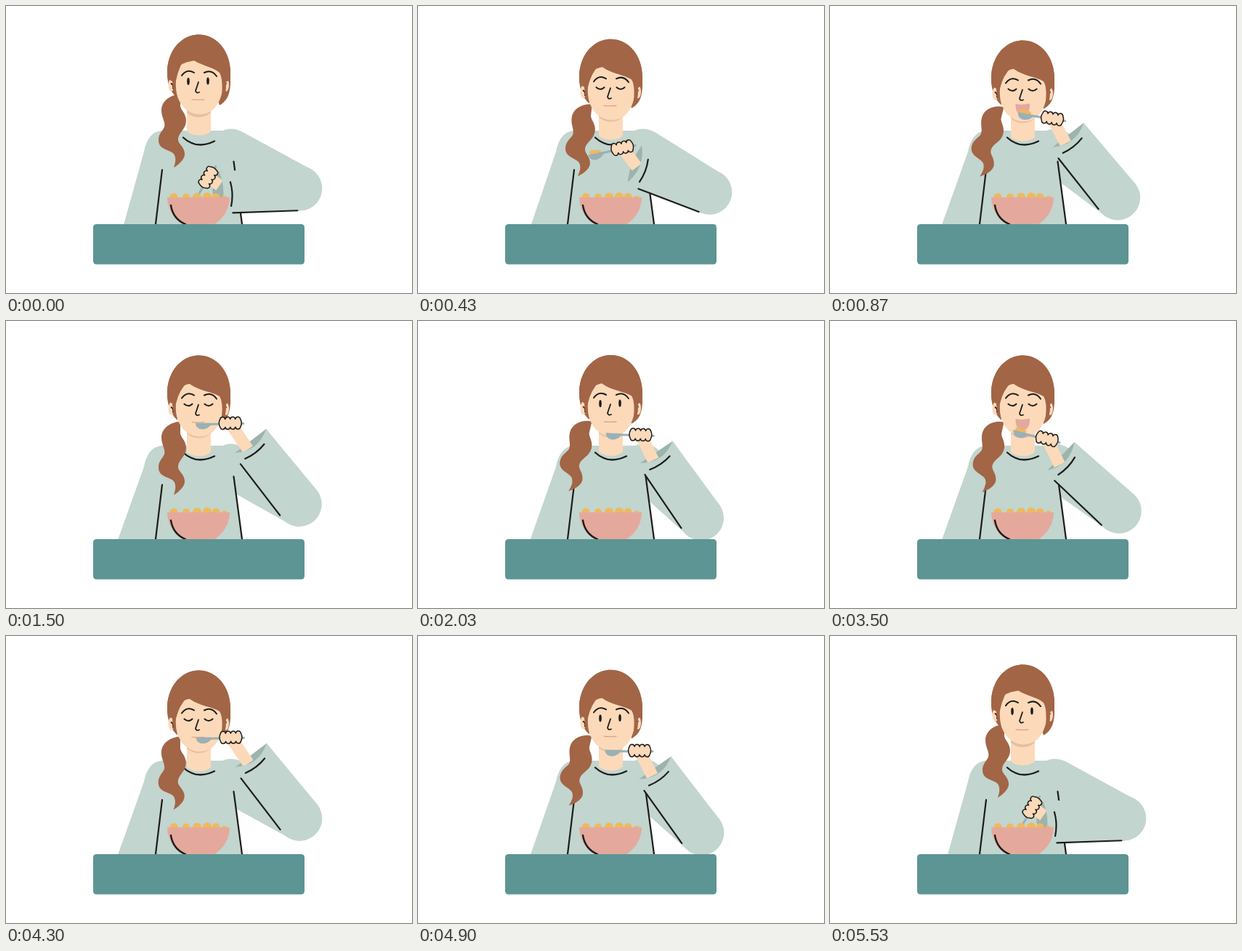
An HTML page that plays this animation: 559x396 px, repeating every 5610 ms.

```html
<!DOCTYPE html>
<html lang="en">
<head>
<meta charset="utf-8">
<title>Eating from a bowl</title>
<style>
  html, body { margin: 0; width: 100%; height: 100%; overflow: hidden; background: #fff; }
  svg { display: block; width: 100vw; height: 100vh; }
</style>
</head>
<body>
<svg id="stage" viewBox="0 0 559 396"></svg>
<script>
const LOOP = 5610, MEAL = LOOP / 2, FIRST_HOLD = 100, STEP = 69.6, STEP_LEAD = 20;
const INK = '#1d1d1b', SKIN = '#fcd9b9', SHADE = '#e6bfa0', HAIR = '#a26546',
  SHIRT = '#c2d5ce', CUFF = '#9db3ad', METAL = '#9ab1b5', FOOD = '#f0b95a',
  PINK = '#e4a99c', TABLE = '#5c9593';
const SHOULDER = { x: 310, y: 200 }, UPPER = 107.5, FORE = 110;

// Each row: time, upper arm angle, forearm angle, spoon angle, hand offset x, y, reach
const rest = [28.7, 178, 121.5, -16, -19, 0];
const armKeys = [
  [0, ...rest], [100, ...rest],
  [695, 35.2, 222.8, 194, -19, -24, 1],
  [870, 36.8, 231.8, 189, -22, -23, 1],
  [1320, 25, 234, 178, -28, -25, 1],
  [1495, 29.4, 232.5, 179, -28, -24.5, 1],
  [2030, 42, 236, 182, -22, -24, 1],
  [2725, ...rest], [MEAL, ...rest]
];
const nodKeys = [[0, 0], [100, 0], [225, .22], [600, 1], [1930, 1], [2400, .5], [2750, 0], [MEAL, 0]];
const tailKeys = [[0, 0], [100, 0], [695, 12], [870, 14], [1200, 13.5], [1495, 0],
  [1830, 10], [2030, 13.5], [2725, 0], [MEAL, 0]];
const browKeys = [[0, 0], [1265, 0], [1345, 6], [1425, 0], [MEAL, 0]];

// Monotone cubic interpolation of one column
function sample(keys, time, col = 1) {
  let i = 0;
  while (i < keys.length - 2 && time >= keys[i + 1][0]) i++;
  const slope = k => k < 0 || k > keys.length - 2 ? 0
    : (keys[k + 1][col] - keys[k][col]) / (keys[k + 1][0] - keys[k][0]);
  const tangent = k => {
    const a = slope(k - 1), b = slope(k);
    return a * b <= 0 ? 0 : 2 * a * b / (a + b);
  };
  const span = keys[i + 1][0] - keys[i][0], u = (time - keys[i][0]) / span;
  const p = keys[i][col], q = keys[i + 1][col], s = u * u * (3 - 2 * u);
  return p + (q - p) * s + span * u * (1 - u) * ((1 - u) * tangent(i) - u * tangent(i + 1));
}

const polar = (origin, length, deg) => ({
  x: origin.x + length * Math.cos(deg * Math.PI / 180),
  y: origin.y + length * Math.sin(deg * Math.PI / 180)
});
const fill = (d, color) => `<path d="${d}" fill="${color}"/>`;
const line = (d, width = 2, color = INK, cap = 'round') =>
  `<path d="${d}" fill="none" stroke="${color}" stroke-width="${width}" stroke-linecap="${cap}"/>`;
const oval = (x, y, rx, ry, color) => `<ellipse cx="${x}" cy="${y}" rx="${rx}" ry="${ry}" fill="${color}"/>`;
const group = (transform, content) => `<g transform="${transform}">${content}</g>`;

function body(nod, elbow) {
  return line(`M${SHOULDER.x} ${SHOULDER.y}L${elbow.x} ${elbow.y}`, 61, SHIRT)
    + fill(`M${162 - 8 * nod} 302L190 201Q195 174 214 172H308Q313 180 313 214L325 302Z`, SHIRT)
    + line('M215 226L206 301M313.5 214.5L325 301', 2.2)
    + line('M244 181.5Q262 198.5 287 186.5', 2.3);
}

function ponytail(nod, angle) {
  return group(`translate(0 ${17 * nod}) rotate(${angle} 238 120)`, fill(
    'M240 122C228 122 214 130 214 144C214 154 220 160 218 167C216 172 210 176 210 185' +
    'C210 199 226 198 231 204C235 210 233 217 231 223C241 217 247 209 246 203' +
    'C245 193 236 190 237 183C238 174 248 170 248 158C248 147 239 143 240 136Z', HAIR));
}

function features(time, nod) {
  const closed = time > 430 && time < 1650, open = time > 480 && time < 1250;
  const lift = sample(browKeys, time);
  const eyes = closed
    ? line('M245.5 104Q251 109 256.5 104M273.5 104Q279 109 284.5 104')
    : oval(251, 104, 1.8, 5, INK) + oval(278, 103.5, 1.8, 5, INK);
  const gape = open ? Math.min(1, (time - 480) / 130, (1250 - time) / 100) : 0;
  const corner = 124 + 10 * gape, chin = 124 + 16.5 * gape;
  const mouth = gape > 0
    ? fill(`M255.5 124.5Q265 126.5 275 124C276 ${corner} 271 ${chin} 265 ${chin}` +
      `C259 ${chin} 255 ${corner} 255.5 124.5Z`, PINK)
    : line('M256 129Q265 130 273 129', 1.2, '#dca287');
  return group(`translate(0 ${10.5 * nod})`,
    group(`translate(0 ${-lift})`, line('M242 96Q249 86 259 92M273 92Q283 87 290 97'))
    + eyes + line('M265 105L261 117Q262 121 266 119', 1.8) + mouth);
}

function head(time, nod, tail) {
  const y = (base, travel) => base + travel * nod;
  const crown = `M222 ${y(92, 8)}C222 ${y(62, 8)} 241 ${y(39.5, 8)} 265.5 ${y(39.5, 8)}` +
    `C290 ${y(39.5, 8)} 309 ${y(62, 8)} 309 ${y(92, 8)}`;
  const back = crown + `V${y(108, 6)}C308 ${y(124, 6)} 303 ${y(132, 5)} 294 ${y(137, 5)}` +
    `L288 120H242L235 ${y(126, 10)}C226 ${y(118, 9)} 222 ${y(108, 8)} 222 ${y(92, 8)}Z`;
  // Fringe with a pointed parting and a lock of hair in front of each ear
  const fringe = crown + `V${y(101, 9)}L303 ${y(105, 10)}Q304 ${y(124, 8)} 296 ${y(134, 6)}` +
    `Q300 ${y(102, 11)} 294 ${y(92, 12)}C283 ${y(82, 15)} 261 ${y(82, 14)} 250 ${y(67, 17)}` +
    `Q238 ${y(82, 14)} 234 ${y(103, 11)}Q233 ${y(114, 11)} 236 ${y(126, 11)}` +
    `Q229 ${y(118, 11)} 229 ${y(104, 10)}L223 ${y(101, 9)}Q222 ${y(98, 8)} 222 ${y(92, 8)}Z`;
  const neck = fill('M249 135H282V173Q276 178.5 265.5 178.5Q255 178.5 249 173Z', SKIN)
    + fill('M249 140H282V147Q275 153.5 265.5 153.5Q256 153.5 249 147Z', SHADE);
  const face = fill('M233 85V112C236 138 252 149.5 266 149.5C283 149.5 295 138 299 112V85Q266 65 233 85Z', SKIN);
  const ears = oval(227.5, 109, 4, 9, SKIN) + oval(303, 109, 4, 9, SKIN)
    + line('M227.5 107Q231 109 230 114M303 107Q299 110 301 114', 1.7);
  return group(`translate(0 ${8 * nod})`, neck)
    + fill(back, HAIR) + ponytail(nod, tail)
    + group(`translate(0 ${10 * nod})`, face)
    + group(`translate(0 ${12 * nod})`, ears) + fill(fringe, HAIR) + features(time, nod);
}

function spoonHand(x, y, angle, hasFood) {
  const knuckles = 'a3.6 4 0 0 1 7 0'.repeat(4);
  const palm = 'a3.6 4 0 0 1 -7 0'.repeat(4);
  const food = hasFood ? oval(34, 2, 4, 3, FOOD) + oval(41, 2.5, 4.5, 3.5, FOOD) : '';
  return group(`translate(${x} ${y}) rotate(${angle})`,
    food + line('M-18 -1L34 -1', 3, METAL)
    + fill('M27 .5L48 1Q47 -8 38 -8Q32 -8 27 -2.5Z', METAL)
    + `<path d="M-14 -5.5${knuckles}q3 5.5 0 11${palm}q-3 -5.5 0 -11z" fill="${SKIN}" stroke="${INK}" stroke-width="1.5" stroke-linejoin="round"/>`);
}

function forearm(time, elbow, fore, spoon, dx, dy, reach) {
  const wrist = polar(elbow, FORE, fore);
  const hand = { x: wrist.x + dx, y: wrist.y + dy };
  // Local frame: x runs from elbow to cuff, y across the sleeve
  const local = content => group(`translate(${elbow.x} ${elbow.y}) rotate(${fore})`, content);
  const across = 18 * reach - 8;
  const base = polar(polar(wrist, -7 * reach, fore), -across, fore + 90);
  const bulge = 20 * (1 - reach), dip = 10 + 8 * reach;
  return local(fill(`M${FORE} -27Q${FORE + bulge} 0 ${FORE} 27H88V-27Z`, CUFF))
    + line(`M${hand.x} ${hand.y}L${base.x} ${base.y}`, 16.5, SKIN, 'butt')
    + local(oval(0, 0, 31, 31, SHIRT)
      + fill(`M0 31V-31L92 -30L${FORE} -27Q${FORE - dip} 0 ${FORE} 27Z`, SHIRT)
      + line('M4 -30.5L93 -30.5', 2.2)
      + line('M95 -21Q91 -4 95 12', 2.2))
    + spoonHand(hand.x, hand.y, spoon, time > 60 && time < 1250);
}

const bowl = [[231, 263, 5.5], [248, 263, 5], [263, 263, 6], [277, 262.5, 6], [289, 263, 5.5], [301, 265, 4]]
  .map(([x, y, r]) => oval(x, y + .7, r, r, FOOD)).join('')
  + fill('M222 264H308A43 43 0 0 1 222 264Z', PINK)
  + line('M227 275Q230 294 247 301', 2.4)
  + `<rect x="120" y="301" width="291" height="55.5" rx="4.5" fill="${TABLE}"/>`;

const stage = document.getElementById('stage');

function draw(clock) {
  const time = clock % MEAL;
  const [upper, fore, spoon, dx, dy, reach] = [1, 2, 3, 4, 5, 6].map(col => sample(armKeys, time, col));
  const nod = sample(nodKeys, time), tail = sample(tailKeys, time);
  const elbow = polar(SHOULDER, UPPER, upper);
  stage.innerHTML = body(nod, elbow) + head(time, nod, tail)
    + forearm(time, elbow, fore, spoon, dx, dy, reach) + bowl;
}

function tick(now) {
  const clock = now % LOOP;
  const steps = Math.floor((clock - FIRST_HOLD + STEP_LEAD) / STEP);
  draw(clock < FIRST_HOLD ? 0 : FIRST_HOLD + steps * STEP);
  requestAnimationFrame(tick);
}

draw(0);
requestAnimationFrame(tick);
</script>
</body>
</html>
```
